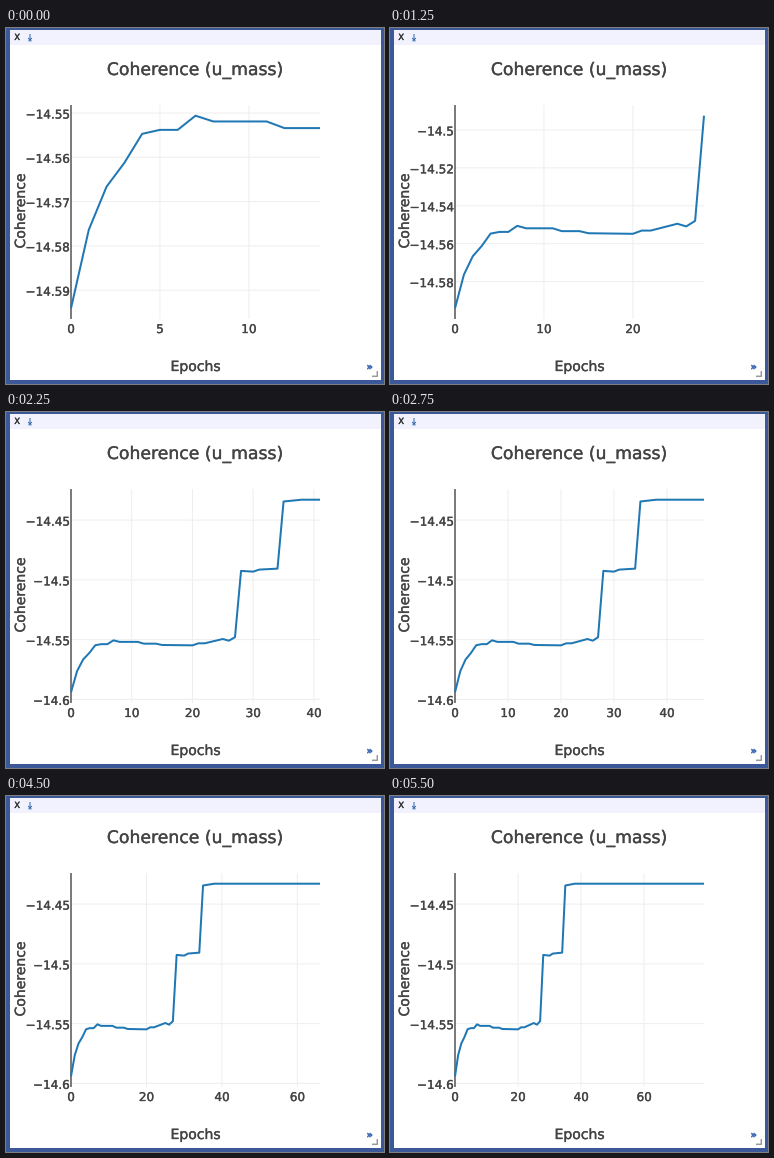
Write a matplotlib script that moves like this. It is 378 px wide and 356 px high and loops after 5.75 s.

```python
import math

import matplotlib.pyplot as plt
import numpy as np
from matplotlib.animation import FuncAnimation
from matplotlib.patches import Rectangle
from matplotlib.patheffects import withStroke

W, H, DPI = 378, 356, 100
LEFT, RIGHT, TOP, BOTTOM = 65, 314, 77, 291
PAD = 0.05 * (BOTTOM - TOP)
PX = 72 / DPI
FRAMES, INTERVAL = 23, 250
INK, BLUE, ICON, GRID = "#444444", "#1f77b4", "#2f66a9", "#eeeeee"

# Turning points after the warm-up: epoch, score above -14.55 in 1e-4.
TURNS = [(4, -47), (5, -38), (6, -38), (7, -6), (8, -19), (11, -19),
         (12, -34), (14, -34), (15, -45), (20, -48), (21, -31), (22, -31),
         (25, 5), (26, -9), (27, 20), (28, 575), (30, 569), (31, 586),
         (34, 594), (35, 1156), (38, 1171)]

plt.rcParams["font.family"] = "DejaVu Sans"
fig = plt.figure(figsize=(W / DPI, H / DPI), dpi=DPI)
ax = fig.add_axes([0, 0, 1, 1])
ax.set_xlim(0, W)
ax.set_ylim(H, 0)
ax.axis("off")


def box(x0, y0, x1, y1, color):
    ax.add_patch(Rectangle((x0, y0), x1 - x0, y1 - y0, fc=color, lw=0))


def stroke(xs, ys, color, width=1, z=2):
    return ax.plot(xs, ys, color=color, lw=width * PX, zorder=z, snap=False,
                   solid_capstyle="butt", solid_joinstyle="round")[0]


def label(x, y, text, size, ha="center", color=INK, **kw):
    heavier = [withStroke(linewidth=0.25, foreground=color)]
    return ax.text(x, y, text, fontsize=size * PX, ha=ha, va="baseline",
                   color=color, zorder=5, path_effects=heavier, **kw)


def scores(n):
    """Exponential warm-up for four epochs, then the plateaus."""
    epochs = np.arange(n + 1)
    warmup = -47 - 394 * 0.55 ** epochs
    later = np.interp(epochs, *zip(*TURNS))
    return -14.55 + np.where(epochs < 4, warmup, later) * 1e-4


def last_epoch(frame):
    """Steady progress with two stalls."""
    return int(14.9 + 3.19 * (frame - 0.81 * (frame >= 2) - (frame >= 12)))


def tick_step(span, count):
    rough = span / count
    base = 10 ** math.floor(math.log10(rough))
    return base * next(m for m in (2, 5, 10) if m > rough / base + 1e-9)


def ticks(lo, hi, step):
    first = math.ceil(lo / step - 1e-9)
    final = math.floor(hi / step + 1e-9)
    return [round(i * step, 4) for i in range(first, final + 1)]


def draw_window():
    box(0, 0, W, H, "#3b5998")
    box(4, 2, 375, 352, "white")
    box(4, 2, 375, 17, "#f2f2ff")
    label(11.2, 12, "X", 8.5, color="#333333")
    stroke([24, 24], [6, 12], ICON)
    stroke([22.2, 24, 25.8], [10, 12, 10], ICON)
    stroke([22.4, 25.6], [12.8, 12.8], ICON)
    label(363.7, 342, "»", 10, color="#3a66ad", weight="bold")
    stroke([371.3, 371.3, 366], [343, 348.3, 348.3], "#999999", 1.5)


def draw_titles():
    label(189.5, 47, "Coherence (u_mass)", 17.25)
    label(189.5, 343, "Epochs", 14)
    label(19, 183, "Coherence", 14, rotation=90, rotation_mode="anchor")
    stroke([LEFT, LEFT], [TOP, BOTTOM], INK, 1.4, 3)


draw_window()
draw_titles()
curve = stroke([], [], BLUE, 2, 4)
marks = []


def update(frame):
    while marks:
        marks.pop().remove()
    n = last_epoch(frame)
    data = scores(n)
    lo, hi = data.min(), data.max()
    scale = (BOTTOM - TOP - 2 * PAD) / (hi - lo)

    def px(epoch):
        return LEFT + (RIGHT - LEFT) * epoch / n

    def py(score):
        return TOP + PAD + (hi - score) * scale

    for t in ticks(0, n, tick_step(n, 5)):
        if t:
            marks.append(stroke([px(t)] * 2, [TOP, BOTTOM], GRID, 1, 1))
        marks.append(label(px(t), 305, f"{t:g}", 12))

    margin = PAD / scale
    low, high = lo - margin, hi + margin
    for t in ticks(low, high, tick_step(high - low, (BOTTOM - TOP) / 40 + 1)):
        y = py(t)
        marks.append(stroke([LEFT, RIGHT], [y, y], GRID, 1, 1))
        marks.append(label(63.5, y + 5.5, f"{t:g}".replace("-", "\u2212"), 12, "right"))

    curve.set_data(px(np.arange(n + 1)), py(data))
    return [curve, *marks]


anim = FuncAnimation(fig, update, frames=FRAMES, interval=INTERVAL,
                     repeat=True, repeat_delay=0, blit=False)
plt.show()
```
